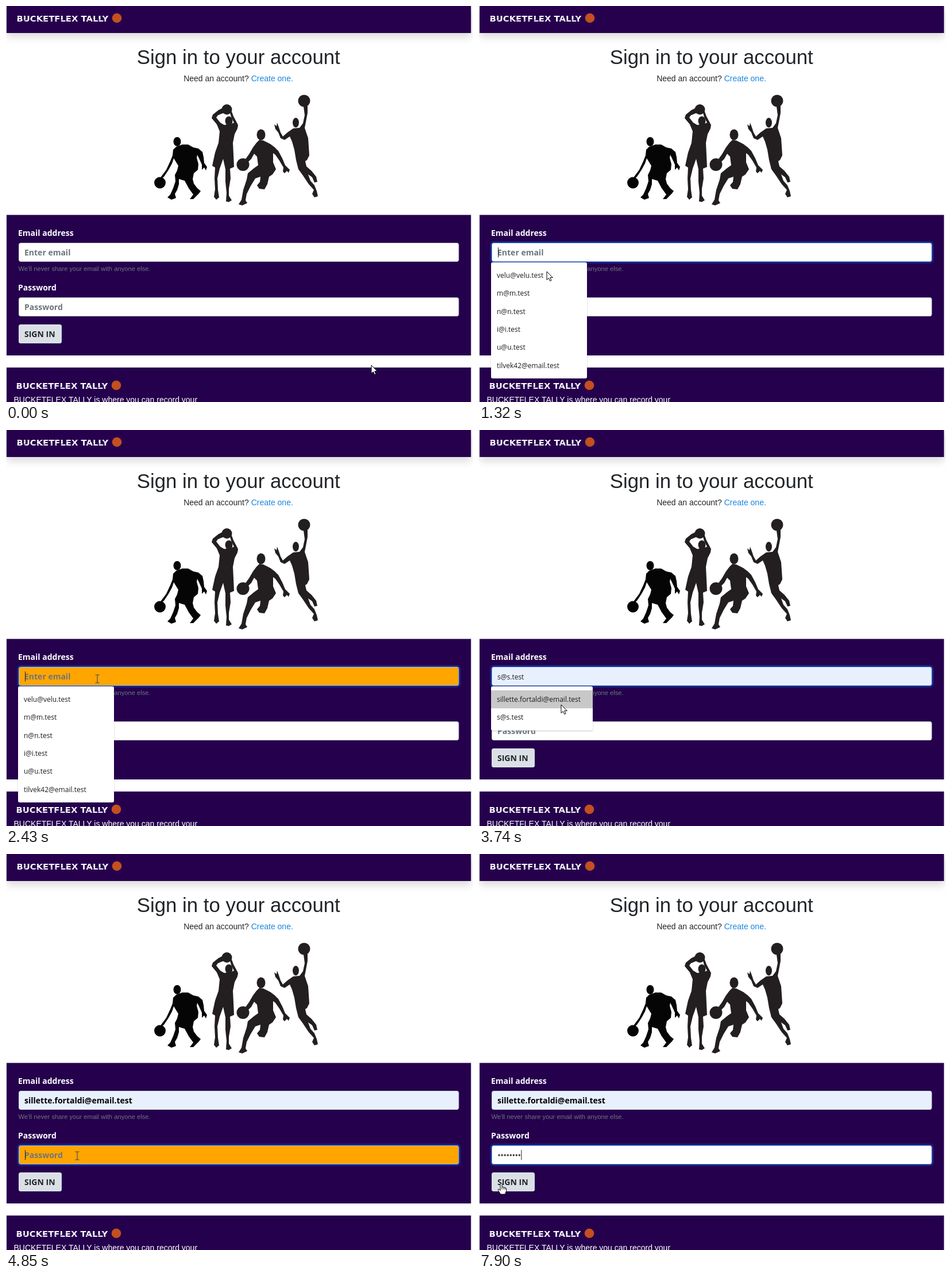
An HTML page that plays this animation: 813 px wide and 689 px high, repeating every 8 s.

```html
<!DOCTYPE html>
<html lang="en">
<head>
<meta charset="utf-8">
<title>Sign in</title>
<style>
  html, body { margin: 0; width: 100%; height: 100%; overflow: hidden; background: #fff; }
  svg { display: block; width: 100vw; height: 100vh; }
  text { font-family: "Liberation Sans", Arial, sans-serif; font-size: 14px; white-space: pre; }
  .bold { font-family: "Open Sans", sans-serif; font-weight: 700; }
  .item { font-family: "Open Sans", sans-serif; font-size: 12px; fill: #1d1d1f; }
  .brand { font-family: "DejaVu Sans", sans-serif; font-weight: 700; font-size: 14.8px; fill: #fff; }
  .hint { fill: #6c757d; }
  .player { fill: #231f20; }
</style>
</head>
<body>
<svg viewBox="0 0 813 689" xmlns="http://www.w3.org/2000/svg">
  <defs>
    <filter id="navShadow" x="-5%" y="-50%" width="110%" height="250%">
      <feDropShadow dx="0" dy="7" stdDeviation="7" flood-opacity=".15"/>
    </filter>
    <filter id="lift" x="-10%" y="-10%" width="120%" height="120%">
      <feDropShadow dx="0" dy="1" stdDeviation="1" flood-opacity=".25"/>
    </filter>
    <g id="logo">
      <text class="brand" x="0" y="5.5">BUCKETFLEX TALLY</text>
      <path d="M0 -1.5H162M4 3H160" stroke="#25004d" stroke-width=".8" stroke-dasharray="3 6 5 9 2 7"/>
      <circle cx="174.500" cy="-.5" r="8.300" fill="#c4501f"/>
    </g>
  </defs>

  <rect width="813" height="689" fill="#fff"/>
  <rect x="1" width="808.500" height="47" fill="#25004d" filter="url(#navShadow)"/>
  <path d="M1 363.500H809.500V608H1ZM1 629H809.500V689H1Z" fill="#25004d"/>
  <use href="#logo" x="18.500" y="21.500"/>
  <use href="#logo" x="17.500" y="660.500"/>
  <text x="13.500" y="690" fill="#fff">BUCKETFLEX TALLY is where you can record your</text>

  <text x="404.800" y="101" text-anchor="middle" style="font-size:34.8px" fill="#212529">Sign in to your account</text>
  <text x="404.500" y="131" text-anchor="middle" fill="#212529">Need an account? <tspan fill="#1a87e0">Create one.</tspan></text>

  <g class="player" style="fill:#050506">
    <ellipse cx="298" cy="236" rx="6.500" ry="8"/><circle cx="268" cy="307.500" r="10"/>
    <path d="M291 250L296 245 307 241 317 241 326 246 335 248 342 254 344 263 345 273 350 280 348 286 345 281 341 285 341 276 336 265 333 259 332 264 335 275 334 285 327 291 325 301 327 309 333 317 339 322 336 326 326 336 320 336 326 328 318 317 311 304 301 301 301 310 298 320 294 327 296 334 288 337 281 333 286 328 291 317 295 305 294 294 298 286 300 278 292 265 289 274 283 285 275 297 269 302 270 297 279 285 286 270 290 260Z"/>
  </g>
  <g class="player">
    <ellipse cx="388" cy="200" rx="6.500" ry="8"/><circle cx="384.500" cy="180" r="9"/>
    <path d="M379 186L369 190 366 194 373 203 380 207 385 206 392 205 397 203 392 193 389 182 392 181 396 192 404 207 403 213 398 223 395 238 396 258 397 280 390 283 391 300 388 318 388 330 393 338 388 341 383 340 384 325 382 306 382 284 378 266 372 283 368 300 369 320 371 333 366 337 362 332 364 319 363 300 364 281 359 278 364 255 370 238 372 218 367 206 358 195 360 189 370 181 378 177Z"/>
  </g>
  <g class="player">
    <ellipse cx="444" cy="224" rx="7.500" ry="9.500"/><circle cx="412.500" cy="276" r="11"/>
    <path d="M436 238L441 233 448 234 460 240 468 246 474 252 481 265 486 277 494 285 492 290 489 287 485 291 482 288 483 281 476 269 469 259 465 256 465 272 470 284 464 293 458 297 455 310 450 319 441 318 437 312 442 306 443 297 434 300 426 313 419 327 417 338 420 343 411 347 405 345 410 337 413 320 419 302 421 291 432 282 439 277 437 262 432 257 427 266 420 273 415 269 423 258 430 246Z"/>
  </g>
  <g class="player">
    <ellipse cx="504.500" cy="203" rx="5.500" ry="8.500"/><circle cx="519" cy="165" r="10.500"/>
    <path d="M518 175L525 173 525 186 522 202 520 212 526 230 527 244 528 260 524 268 521 270 523 279 532 287 540 297 542 306 537 307 533 298 526 293 530 304 537 312 541 322 543 331 537 333 533 327 536 320 527 310 517 295 509 284 505 268 502 250 498 236 494 227 485 233 478 230 474 220 469 214 467 206 471 209 472 203 475 211 478 220 482 227 490 220 500 213 511 212 517 204 520 190Z"/>
  </g>

  <text class="bold" x="21" y="399.500" fill="#fff">Email address</text>
  <text class="hint" x="21.500" y="461" style="font-size:11.2px">We'll never share your email with anyone else.</text>
  <text class="bold" x="21" y="494.500" fill="#fff">Password</text>
  <rect x="22" y="554" width="75" height="33" rx="3.500" fill="#dae0e5"/>
  <text class="bold" x="32" y="575.500" fill="#212529">SIGN IN</text>
  <g id="live"></g>
</svg>
<script>
const LOOP = 8000, TICK = 78.2;
const ROW = 31.33, LIST_TOP = 446;
const MAIL = 'sillette.fortaldi@email.test';
const ALL = ['velu@velu.test', 'm@m.test', 'n@n.test', 'i@i.test', 'u@u.test', 'tilvek42@email.test'];
const MATCHES = [MAIL, 's@s.test'];

// Ticks at which things happen
const FOCUS = 13, OPEN = 14, TYPE = 41, PICK = 52, NEXT = 60;
const KEYS = [72, 74, 76, 77, 81, 82, 84, 86];

// Pointer path: tick, x, y
const PATH = [
  [0, 636, 625], [3, 260, 375], [4, 165, 359], [5, 139, 405], [7, 139, 405],
  [8, 135, 428], [9, 135, 428], [10, 134, 430], [11, 134, 436], [14, 134, 436],
  [15, 128, 450], [16, 128, 450], [17, 118, 462], [21, 118, 629], [22, 116, 629],
  [25, 102, 546], [27, 120, 466], [28, 148, 448], [29, 154, 440], [31, 159, 433],
  [44, 159, 433], [45, 150, 492], [46, 149, 494], [47, 149, 494], [48, 143, 478],
  [52, 142, 474], [55, 131, 500], [57, 126, 518], [62, 124, 525], [92, 124, 525],
  [93, 114, 530], [95, 56, 562], [97, 22, 574], [98, 22, 575], [101, 39, 573.5]
];

const CURSORS = {
  arrow: '<path d="M0 0V14.500L3.400 11.400 5.700 16.500 8 15.500 5.800 10.500H10.300Z" fill="#fff" stroke="#000" stroke-linejoin="round"/>',
  beam: '<path d="M-3.500 -7H-1Q0 -7 0 -6Q0 -7 1 -7H3.500M0 -6V6M-3.500 7H-1Q0 7 0 6Q0 7 1 7H3.500" fill="none" stroke="#2c3f66"/>',
  hand: '<path d="M-2 1Q-2 -.5 -.5 -.5T1 1V6Q3 5 4 6.500 6 6 6.500 7.500 8.500 7 8.500 9V13L6.500 18.500H-1.500L-5.500 12Q-6.500 9.500 -4.500 9.500L-2 12Z" fill="#fff" stroke="#000" stroke-linejoin="round"/><path d="M1 6V10M4 7V10M6.500 8V10" stroke="#000"/>'
};

function pointer(k) {
  let i = 1;
  while (i < PATH.length - 1 && PATH[i][0] < k) i++;
  const [a, ax, ay] = PATH[i - 1], [b, bx, by] = PATH[i];
  const p = Math.min(1, (k - a) / (b - a));
  return [ax + (bx - ax) * p, ay + (by - ay) * p];
}

const listAt = k => k < OPEN || k >= PICK ? [] : k < TYPE ? ALL : MATCHES;

function rowAt(k) {
  if (k < 18) return -1;
  const row = Math.floor((pointer(k)[1] - 451.5) / ROW);
  return row < listAt(k).length ? row : -1;
}

const inside = (y, top) => y >= top && y <= top + 33;
const text = (cls, x, y, s) => `<text class="${cls}" x="${x}" y="${y}">${s}</text>`;
const caret = (x, y) => `<rect x="${x}" y="${y}" width="1" height="17.500" fill="#222"/>`;

function field(y, fill, focused) {
  const box = `x="22.500" y="${y + 0.5}" width="765.500" height="32" rx="3"`;
  const ring = focused ? `<rect ${box} fill="none" stroke="#007bff" stroke-opacity=".28" stroke-width="7"/>` : '';
  return ring + `<rect ${box} fill="${fill}" stroke="${focused ? '#80bdff' : '#ced4da'}"/>`;
}

function emailField(k, hover) {
  const shown = rowAt(k - 1);
  const preview = k < PICK && shown >= 0 ? listAt(k)[shown] : '';
  const focused = k >= FOCUS && k < NEXT;
  const fill = hover ? '#ffa500' : preview || k >= PICK ? '#e8f0fe' : '#fff';
  let out = field(412, fill, focused);
  if (k >= PICK) out += text('bold', 32, 433.5, MAIL);
  else if (preview) out += text('item', 32, 433.5, preview);
  else if (k >= TYPE) out += text('bold', 32, 433.5, 's');
  else out += text('bold hint', 32, 433.5, 'Enter email');
  if (focused && !preview && k < PICK && (k < 38 || k >= TYPE)) out += caret(k < TYPE ? 33 : 40, 420);
  return out;
}

function passwordField(k, hover) {
  const focused = k >= NEXT;
  const count = KEYS.filter(t => k >= t).length;
  let out = field(507, hover ? '#ffa500' : '#fff', focused);
  if (!count) out += text('bold hint', 32, 528.5, 'Password');
  for (let i = 0; i < count; i++) out += `<circle cx="${35 + 5.05 * i}" cy="524" r="1.700" fill="#333"/>`;
  if (focused && (k < 67 || count)) out += caret(33 + 5.05 * count, 515);
  return out;
}

function dropdown(k) {
  const list = listAt(k);
  if (!list.length) return '';
  const w = list === ALL ? 167 : 177, picked = rowAt(k);
  let out = `<rect x="21" y="${LIST_TOP}" width="${w}" height="${list.length * ROW + 14}" rx="3" fill="#fff" filter="url(#lift)"/>`;
  if (picked >= 0) out += `<rect x="21" y="${453 + picked * ROW}" width="${w}" height="${ROW}" fill="#c8c8c8"/>`;
  return out + list.map((s, i) => text('item', 31, 473 + i * ROW, s)).join('');
}

function scene(k) {
  const [x, y] = pointer(k);
  const onEmail = inside(y, 412), onPassword = inside(y, 507) && !listAt(k).length;
  const onButton = x >= 21 && x <= 97 && inside(y, 554);
  const shape = onEmail || onPassword ? 'beam' : onButton ? 'hand' : 'arrow';
  return emailField(k, onEmail) + passwordField(k, onPassword) + dropdown(k) +
    `<g transform="translate(${x} ${y})">${CURSORS[shape]}</g>`;
}

const live = document.getElementById('live');
const start = performance.now();
let last = -1;

function loop() {
  const t = (performance.now() - start) % LOOP;
  const k = Math.min(101, Math.floor((t + 15) / TICK));
  if (k !== last) live.innerHTML = scene(last = k);
  requestAnimationFrame(loop);
}
loop();
</script>
</body>
</html>
```
